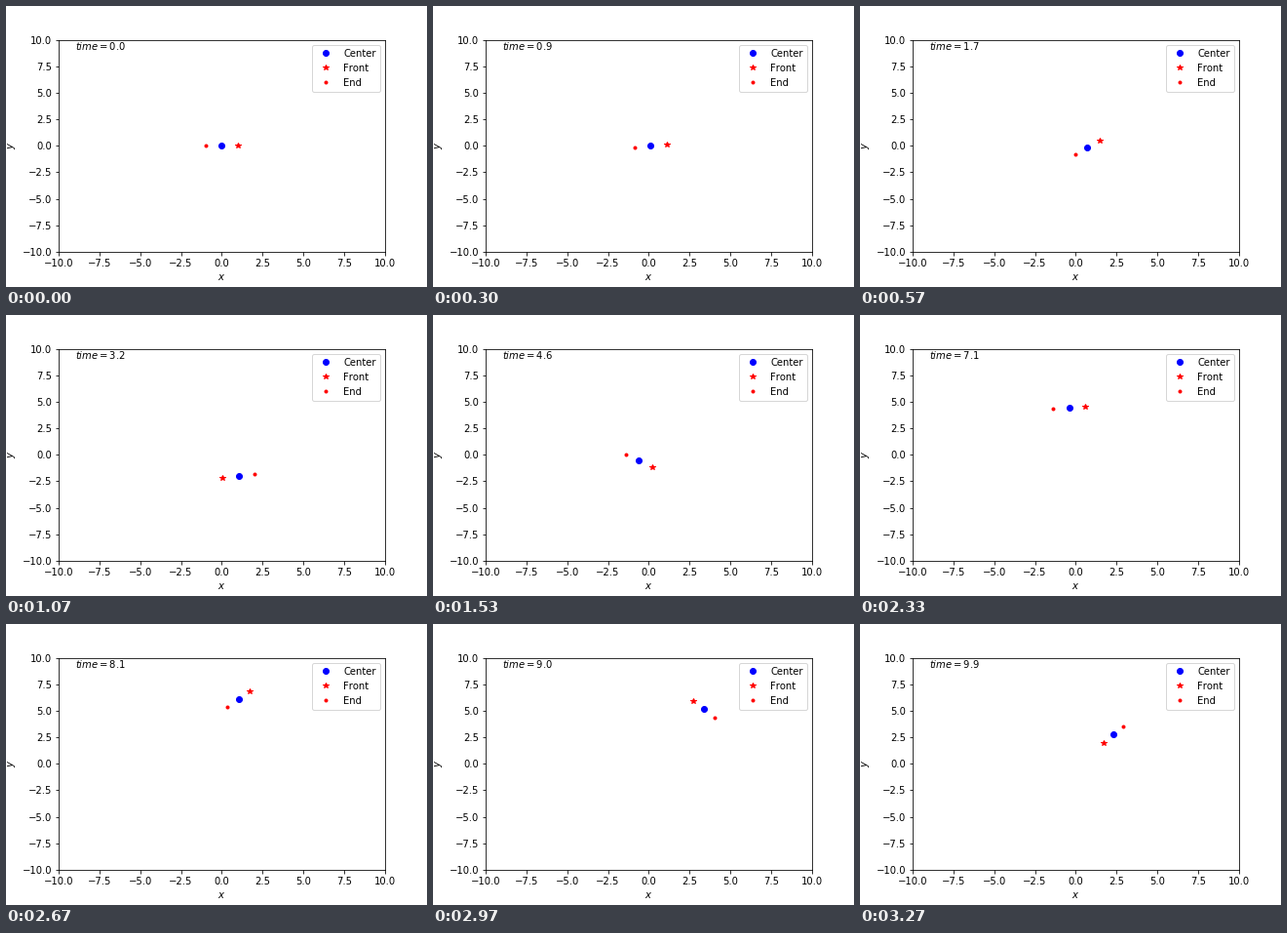
A matplotlib script for the animation above (3.31 s loop, 432 by 288 pixels).

```python
import numpy as np
import matplotlib.pyplot as plt
from matplotlib.animation import FuncAnimation

LOOP_MS, TICK_MS = 3310, 10
STEPS = 99      # pictures in one loop
SUB = 20        # integration steps per picture


def integrate(rate, dt):
    """Running trapezoid integral starting at zero."""
    return np.concatenate([[0], np.cumsum((rate[1:] + rate[:-1]) * dt / 2)])


# A body pushed along its axis and turned, both by sin(t).
# Its velocity in the turning frame obeys u' = sin t + v r, v' = -u r.
t = np.linspace(0, 10, STEPS * SUB + 1)
heading = t - np.sin(t)
spin = np.exp(1j * heading)
velocity = integrate(np.sin(t) * spin, t[1]) / spin
position = integrate(velocity, t[1])

times, pos, axis = t[::SUB], position[::SUB], spin[::SUB]

plt.rcParams.update({
    "font.family": "DejaVu Sans",
    "font.size": 10,
    "text.kerning_factor": 6,
})
fig = plt.figure(figsize=(6, 4), dpi=72, facecolor="white")
fig.subplots_adjust(left=0.125, right=0.9, bottom=0.125, top=0.88)
ax = fig.add_subplot(xlim=(-10, 10), ylim=(-10, 10))
ax.set_xlabel("$x$")
ax.set_ylabel("$y$")

center, = ax.plot([], [], "bo", label="Center")
front, = ax.plot([], [], "r*", label="Front")
end, = ax.plot([], [], "r.", label="End")
clock = ax.text(-9, 9, "")
ax.legend(loc="upper right")


def place(marker, point):
    marker.set_data([point.real], [point.imag])


def update(tick):
    # 30 pictures a second, rounded to whole ticks
    i = min((2 * tick + 1) * 3 // 20, STEPS - 1)
    place(center, pos[i])
    place(front, pos[i] + axis[i])
    place(end, pos[i] - axis[i])
    clock.set_text(f"$time = {times[i]:.1f}$")
    return center, front, end, clock


anim = FuncAnimation(fig, update, frames=LOOP_MS // TICK_MS,
                     init_func=lambda: update(0), interval=TICK_MS,
                     repeat=True, repeat_delay=0)
plt.show()
```
